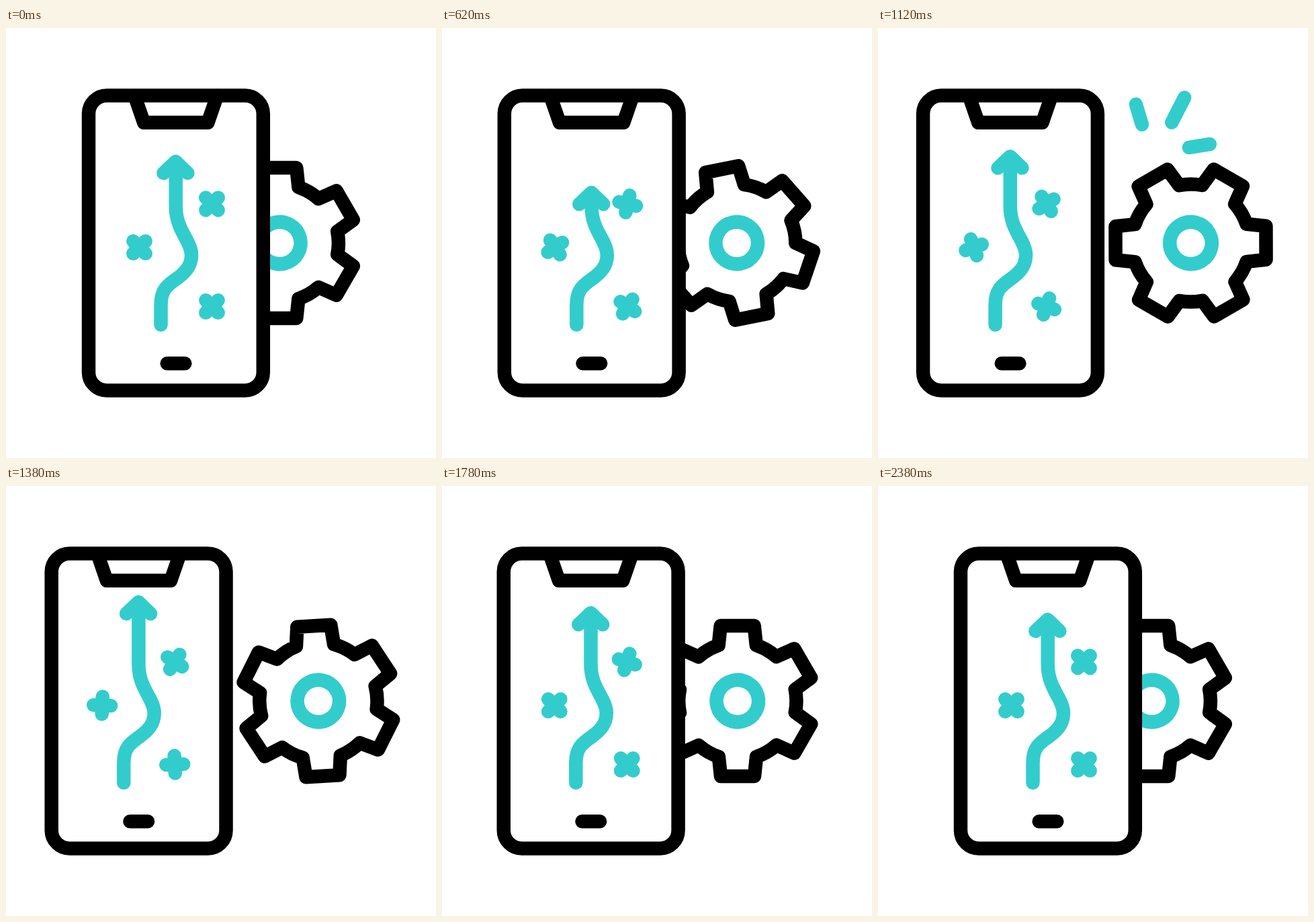
An HTML page for the animation above (2400 ms loop, 640 by 640 pixels).

```html
<!DOCTYPE html>
<html lang="en">
<head>
<meta charset="utf-8">
<title>Phone and gear</title>
<style>
  html, body { margin: 0; width: 100%; height: 100%; overflow: hidden; background: #fff; }
  svg { display: block; width: 100vw; height: 100vh; }
  .ink, .teal { fill: none; stroke-width: 20.5; stroke-linecap: round; stroke-linejoin: round; }
  .ink { stroke: #000; }
  .teal { stroke: #3cc; }
</style>
</head>
<body>
<svg viewBox="0 0 640 640">
  <g id="sparks" class="teal"></g>
  <g id="gear">
    <path id="cog" class="ink"/>
    <circle class="teal" r="31.3"/>
  </g>
  <g id="phone">
    <rect class="ink" style="fill:#fff" x="123" y="100.6" width="259.8" height="438.8" rx="27"/>
    <path class="ink" d="M191.4 101L205.2 140.8H300.4L314.2 101"/>
    <path class="ink" d="M239.7 499.2H266.3"/>
    <path id="route" class="teal"/>
    <path id="head" class="teal" d="M234.4 216L252.6 198.8L270.4 216"/>
    <g id="stars" class="teal"></g>
  </g>
</svg>
<script>
const LOOP = 2400;
const NS = 'http://www.w3.org/2000/svg';
const $ = id => document.getElementById(id);
const span = (t, from, length) => Math.min(1, Math.max(0, (t - from) / length));
const ease = x => x < 0.5 ? 4 * x ** 3 : 1 - 4 * (1 - x) ** 3;
const mix = (a, b, x) => a + (b - a) * x;

// Spin that picks up quickly and settles slowly
function settle(x) {
  const s = x ** 0.8;
  return s * s * (3 - 2 * s);
}

function move(el, x, y, angle = 0) {
  el.setAttribute('transform', `translate(${x} ${y}) rotate(${angle})`);
}

function addPath(parent, d = '') {
  const p = document.createElementNS(NS, 'path');
  p.setAttribute('d', d);
  return parent.appendChild(p);
}

// Six teeth joined by arcs of the hub
function cogPath() {
  const hub = 87.6, half = 18.7 * Math.PI / 180;
  const bx = hub * Math.cos(half), by = hub * Math.sin(half);
  let d = '';
  for (let i = 0; i < 6; i++) {
    const c = Math.cos(i * Math.PI / 3), s = Math.sin(i * Math.PI / 3);
    const at = (x, y) => (x * c - y * s).toFixed(2) + ' ' + (x * s + y * c).toFixed(2);
    d += (i ? `A${hub} ${hub} 0 0 1 ` : 'M') + at(bx, -by) +
      'L' + at(112, -25) + 'L' + at(112, 25) + 'L' + at(bx, by);
  }
  return d + `A${hub} ${hub} 0 0 1 ${bx} ${-by}Z`;
}
$('cog').setAttribute('d', cogPath());

const stars = [
  { x: 306.5, y: 261.8, turn: 360, time: 1890 },
  { x: 198.5, y: 326.5, turn: -360, time: 1520 },
  { x: 306.5, y: 414.5, turn: 360, time: 1520 }
];
for (const s of stars) s.el = addPath($('stars'), 'M-9.2-9.2L9.2 9.2M9.2-9.2L-9.2 9.2');

const sparks = [
  { x: 393, y: 144, dx: -18, dy: -60 },
  { x: 437, y: 141, dx: 38, dy: -74 },
  { x: 462.5, y: 178, dx: 62, dy: -10 }
];
for (const s of sparks) s.el = addPath($('sparks'));

// Down, up past the start, and back, in three equal steps
function arrowShift(t) {
  const step = 700, low = 46.5, high = -26;
  if (t < step) return mix(0, low, ease(t / step));
  if (t < 2 * step) return mix(low, high, ease(t / step - 1));
  return mix(high, 0, ease(span(t, 2 * step, step)));
}

// A short first roll, then the main turn
function gearAngle(t) {
  return 30 + 48 * ease(span(t, 0, 700)) + 312 * settle(span(t, 605, 1190));
}

function draw(t) {
  const apart = ease(1 - Math.abs(Math.max(0, t - 5) / 1200 - 1));
  move($('phone'), -56 * apart, 0);
  move($('gear'), 407.3 + 58.3 * apart, 320, gearAngle(t));

  const dy = arrowShift(t);
  move($('head'), 0, dy);
  $('route').setAttribute('d', 'M230.5 441.8V412C230.5 390 240 383 253.5 373.5' +
    `C267 364 276 354 276 338C276 316 252.7 302 252.7 265V${200 + dy}`);

  for (const s of stars) move(s.el, s.x, s.y, s.turn * settle(span(t, 280, s.time)));

  const tip = span(t, 1040, 160), tail = span(t, 1120, 180);
  $('sparks').setAttribute('visibility', tip > 0 && tail < 1 ? 'visible' : 'hidden');
  for (const { x, y, dx, dy, el } of sparks)
    el.setAttribute('d', `M${x + dx * tail} ${y + dy * tail}L${x + dx * tip} ${y + dy * tip}`);
}

const start = performance.now();
function tick() {
  draw((performance.now() - start) % LOOP);
  requestAnimationFrame(tick);
}
tick();
</script>
</body>
</html>
```
